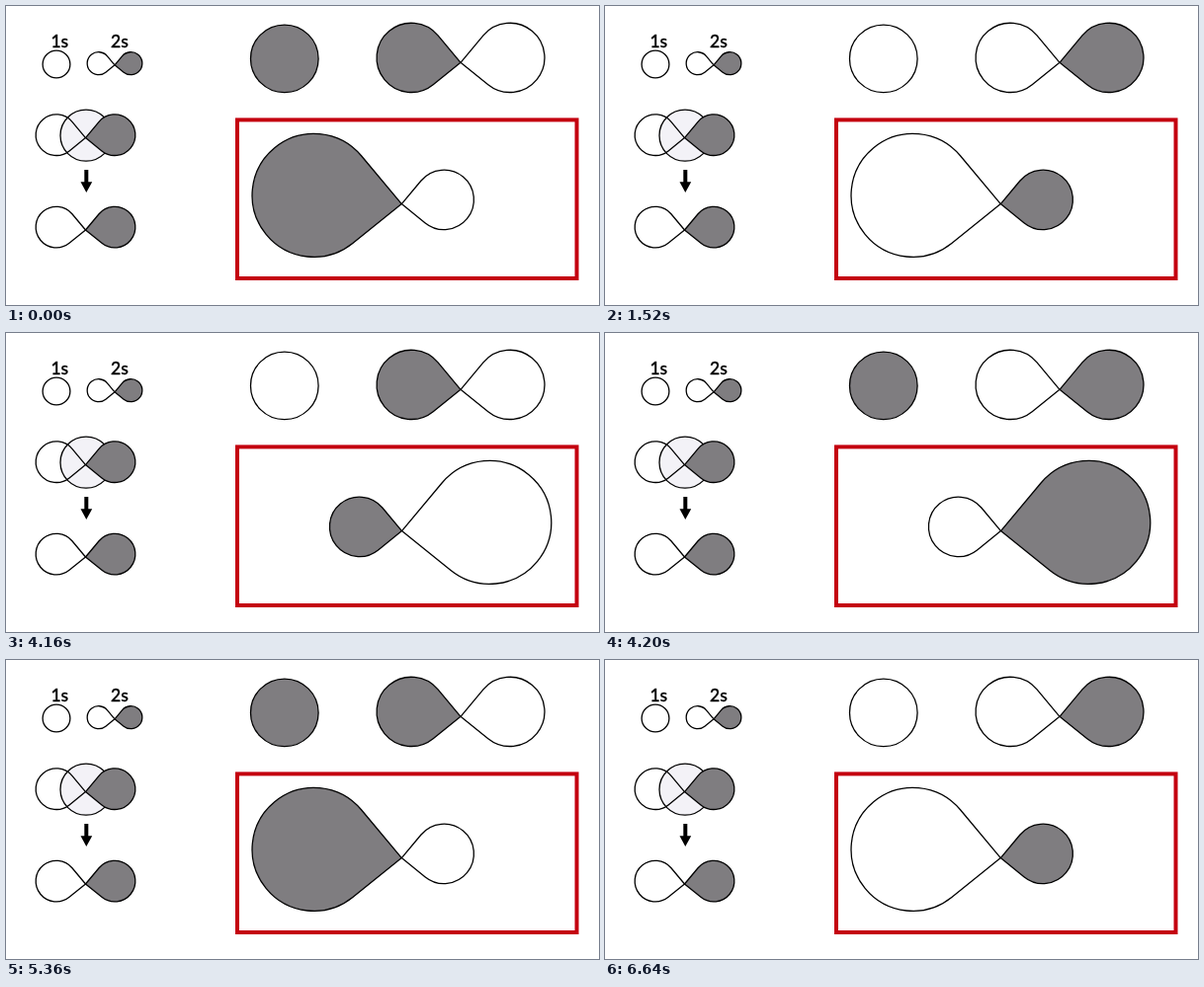
Animation of 600x303 px, one loop 8000 ms. Source, as an HTML page:

```html
<!DOCTYPE html>
<html lang="en">
<head>
<meta charset="utf-8">
<title>Orbital phases</title>
<style>
  html, body { margin: 0; width: 100%; height: 100%; overflow: hidden; background: #fff; }
  svg { display: block; width: 100%; height: 100%; }
  .line { fill: #fff; stroke: #000; stroke-width: 1.3; stroke-linejoin: round; }
  .clear { fill: none; }
  .cloud { fill: #f3f2f7; }
  .gray { fill: #7f7d80; }
  text { font: 500 17.5px Lato, Carlito, sans-serif; text-anchor: middle; stroke: #000; stroke-width: .35; }

  .s, .left, .right, .pair1, .pair2 { animation: 8s step-end infinite; }
  .s { animation-name: s; }
  .left { animation-name: left; }
  .right { animation-name: right; }
  .pair1 { animation-name: pair1; }
  .pair2 { animation-name: pair2; }
  @keyframes s {
    0%, 52.5%, 67% { fill: #7f7d80; }
    16%, 82.5%, 100% { fill: #fff; }
  }
  @keyframes left {
    0%, 35%, 67% { fill: #7f7d80; }
    16%, 52.5%, 82.5%, 100% { fill: #fff; }
  }
  @keyframes right {
    0%, 35%, 67% { fill: #fff; }
    16%, 52.5%, 82.5%, 100% { fill: #7f7d80; }
  }
  @keyframes pair1 {
    0%, 67%, 100% { visibility: visible; }
    35% { visibility: hidden; }
  }
  @keyframes pair2 {
    0%, 67%, 100% { visibility: hidden; }
    35% { visibility: visible; }
  }
</style>
</head>
<body>
<svg viewBox="0 0 600 303">
  <text x="54.3" y="42">1s</text>
  <text x="115" y="42">2s</text>
  <circle class="line" cx="51" cy="59" r="13.9"/>
  <g id="legend"></g>
  <circle class="line cloud" cx="81" cy="131.2" r="26"/>
  <g id="mix"></g>
  <path d="M79.3 166h4v12.2h3.9L81.3 189 75.5 178.2h3.8z"/>
  <g id="sum"></g>
  <circle class="line s" cx="281.8" cy="53.4" r="34.3"/>
  <g id="p"></g>
  <rect x="234" y="115.4" width="343.5" height="160.6" fill="none" stroke="#c4000f" stroke-width="4"/>
  <g id="first" class="pair1"></g>
  <g id="second" class="pair2"></g>
</svg>
<script>
// A lobe is a circle beside and slightly above the node, joined to it by tangents.
function lobe(parent, x, y, r, side, style) {
  const dx = side * 1.42, dy = -0.14;
  const axis = Math.atan2(-dy, -dx), spread = Math.acos(1 / Math.hypot(dx, dy));
  const at = a => `${x + r * (dx + Math.cos(a))} ${y + r * (dy + Math.sin(a))}`;
  const path = document.createElementNS('http://www.w3.org/2000/svg', 'path');
  path.setAttribute('class', 'line ' + style);
  path.setAttribute('d', `M${x} ${y}L${at(axis + spread)}A${r} ${r} 0 1 1 ${at(axis - spread)}Z`);
  document.getElementById(parent).append(path);
}

function pair(parent, x, y, leftR, rightR, leftStyle, rightStyle) {
  lobe(parent, x, y, leftR, -1, leftStyle);
  lobe(parent, x, y, rightR, 1, rightStyle);
}

const big = 62.5, small = 30.2, medium = 20.8;
pair('legend', 110, 59.8, 11.5, 11.5, '', 'gray');
pair('sum', 80.5, 227, medium, medium, '', 'gray');
pair('p', 460, 57.3, 35.1, 35.1, 'left', 'right');
pair('first', 400.3, 200.6, big, small, 'left', 'right');
pair('second', 400.5, 200.6, small, big, 'left', 'right');

// The s cloud shows through the left lobe and is hidden by the right one.
pair('mix', 80.5, 133.6, medium, medium, 'clear', 'gray');
</script>
</body>
</html>
```
